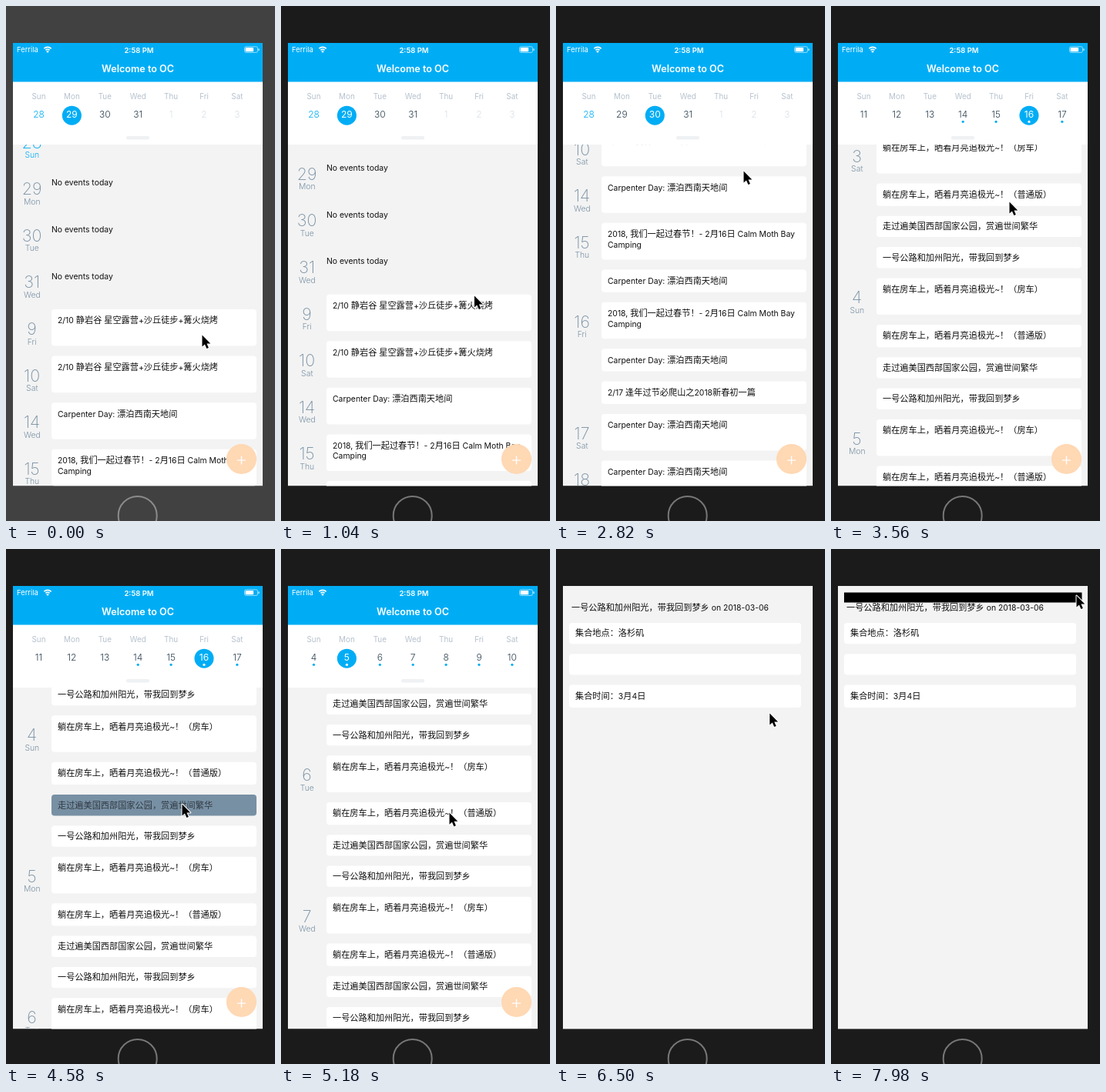
These frames come from a looping animation (349 by 669 pixels, 8 s). An HTML page with a canvas:

```html
<!DOCTYPE html>
<html lang="zh">
<head>
<meta charset="utf-8">
<title>Agenda</title>
<style>
html, body { margin: 0; width: 349px; height: 669px; overflow: hidden; background: #1b1b1b; }
canvas { display: block; }
</style>
</head>
<body>
<canvas id="stage" width="349" height="669"></canvas>
<script>
const g = document.getElementById('stage').getContext('2d');
const LOOP = 8000, TICK = 147.7; // the picture advances once per tick
const BLUE = '#00adf5', GREY = '#f3f3f3', SLATE = '#7a92a5', INK = '#111';
const LATIN = 'Inter, "Open Sans", sans-serif';
const CJK = '"Noto Sans CJK SC", "Noto Sans CJK", sans-serif';
const SCREEN = [9, 48, 324, 575.6], HEADER_BOTTOM = 98.4;

// A value moves by `delta` between two ticks; power 1 is a steady drag, higher ones coast to rest.
const clamp = p => Math.max(0, Math.min(1, p));
const easeOut = (p, power) => 1 - (1 - clamp(p)) ** power;
const leg = (n, from, to, delta, power = 1) => delta * easeOut((n - from) / (to - from), power);

const scrollAt = n => leg(n, 6, 9, 58) + leg(n, 15, 19, 236)
  + leg(n, 19, 31.1, 679, 3) + leg(n, 31, 36, 328, 2);

// From tick, to tick, dx, dy.
const STROKES = [[4, 9, -6, -85], [10, 13, 3, 111], [15, 19, -8, -239], [19, 24, -12, 40],
  [24, 31, -3, 77], [31, 33, -6, -126], [33, 36, -6, 206], [41, 45, 81, -264], [46, 51, 21, -87]];
const pointerAt = n => STROKES.reduce(([x, y], [from, to, dx, dy]) =>
  [x + leg(n, from, to, dx), y + leg(n, from, to, dy)], [254.5, 427.5]);

const NONE = 'No events today';
const NIGHT = '2/10 静岩谷 星空露营+沙丘徒步+篝火烧烤';
const ROAM = 'Carpenter Day: 漂泊西南天地间';
const CAMP = '2018, 我们一起过春节！- 2月16日 Calm Moth Bay\nCamping';
const TOUR = ['躺在房车上，晒着月亮追极光~！（房车）', '躺在房车上，晒着月亮追极光~！（普通版）',
  '走过遍美国西部国家公园，赏遍世间繁华', '一号公路和加州阳光，带我回到梦乡'];
const WEEK = ['Sun', 'Mon', 'Tue', 'Wed', 'Thu', 'Fri', 'Sat'];

const rowHeight = s => /[!-~]/.test(s) ? 29.3 : 27.3;
const rows = [];
let nextTop = 151.6;
function section(day, weekday, ...items) {
  items.forEach((text, i) => {
    const h = i ? rowHeight(text) : 47.6;
    rows.push({ text, h, top: nextTop, day: i ? 0 : day, weekday: WEEK[weekday] });
    nextTop += h + 13;
  });
}
for (let i = 0; i < 4; i++) section(28 + i, i, NONE);
section(9, 5, NIGHT);
section(10, 6, NIGHT);
section(14, 3, ROAM);
section(15, 4, CAMP, ROAM);
section(16, 5, CAMP, ROAM, '2/17 逢年过节必爬山之2018新春初一篇');
section(17, 6, ROAM);
section(18, 0, ROAM);
section(19, 1, ROAM);
for (let d = 3; d < 11; d++) section(d, (d + 3) % 7, ...TOUR);

function rect(x, y, w, h, color, r = 0) {
  g.fillStyle = color;
  g.beginPath();
  g.roundRect(x, y, w, h, r);
  g.fill();
}

function disc(x, y, r, color) {
  g.fillStyle = color;
  g.beginPath();
  g.arc(x, y, r, 0, 7);
  g.fill();
}

function arc(x, y, r, from, to, color, width) {
  g.strokeStyle = color;
  g.lineWidth = width;
  g.beginPath();
  g.arc(x, y, r, from, to);
  g.stroke();
}

// y is the middle of the capitals; Chinese runs are set a little larger.
function label(s, x, y, size = 10.4, color = INK, weight = 400, centered = false) {
  const runs = s.match(/[\x00-\xff]+|[^\x00-\xff]+/g).map(text => {
    const cjk = text.charCodeAt(0) > 255;
    const font = `${weight} ${cjk ? size * 1.075 : size}px ${cjk ? CJK : LATIN}`;
    g.font = font;
    return { text, font, width: g.measureText(text).width };
  });
  if (centered) x -= runs.reduce((sum, r) => sum + r.width, 0) / 2;
  g.fillStyle = color;
  for (const r of runs) {
    g.font = r.font;
    g.fillText(r.text, x, y + size * 0.37);
    x += r.width;
  }
}

function drawList(scroll, pressY) {
  for (const row of rows) {
    const y = row.top - scroll;
    if (y > 626 || y < 90) continue;
    if (row.day) {
      const color = row.day === 28 ? BLUE : SLATE;
      label(String(row.day), 33.6, y + 25, 21.5, color, 200, true);
      label(row.weekday, 33.8, y + 41.7, 10.4, color, 300, true);
    }
    if (row.text === NONE) {
      label(NONE, 59, y + 17.3);
      continue;
    }
    const pressed = pressY > y && pressY < y + row.h;
    rect(59, y, 266, row.h, pressed ? '#7890a4' : '#fff', 4);
    const mid = y + Math.min(row.h, 29.3) / 2;
    row.text.split('\n').forEach((line, i) =>
      label(line, 67, mid + i * 13.5, 10.4, pressed ? '#303a43' : INK));
  }
}

// First day of the shown week, and the selected column.
function calendarState(n) {
  if (n < 20) return [28, n < 17 ? 1 : 2];
  if (n < 33) return [11, n < 22 ? 3 : 5];
  return [4, n < 35 ? 0 : 1];
}

function drawCalendar(n) {
  const [first, selected] = calendarState(n);
  rect(SCREEN[0], 97, SCREEN[2], 83, '#fff');
  rect(156, 169, 30, 4.5, '#eff1f3', 2);
  WEEK.forEach((name, i) => {
    const x = 42.5 + i * 42.9, day = (first + i - 1) % 31 + 1;
    const on = i === selected, nextMonth = first === 28 && day < 28;
    const color = on ? '#fff' : nextMonth ? '#d9e1e8' : day === 28 ? BLUE : '#2d4150';
    label(name, x, 117, 9.9, '#b6c1cd', 400, true);
    if (on) disc(x, 142.2, 12.5, BLUE);
    label(String(day), x, 141, 12, color, on ? 400 : 300, true);
    if (first === 4 || first === 11 && day > 13) disc(x, 150.3, 1.6, on ? '#fff' : BLUE);
  });
}

function drawStatus() {
  label('Ferrila', 14, 57, 9.4, '#fff');
  label('2:58 PM', 172.5, 57, 9.5, '#fff', 600, true);
  for (const r of [3.6, 6.6]) arc(54, 60, r, -2.35, -0.79, '#fff', 1.6);
  disc(54, 59.3, 1.3, '#fff');
  g.lineWidth = 0.7;
  g.strokeStyle = '#d5f2ff';
  g.beginPath();
  g.roundRect(309.5, 52.8, 17, 7.6, 2);
  g.stroke();
  rect(310.6, 53.9, 10.5, 5.4, '#fff', 1);
  rect(327.4, 55.2, 1.2, 2.8, '#d5f2ff', 0.6);
}

function drawAgenda(n, pointerY) {
  const collapsed = n >= 39, pressing = n === 31 || n >= 38;
  const shift = collapsed ? -2 : 0;
  const [left, top, width] = SCREEN;
  g.save();
  g.translate(0, shift);
  drawList(scrollAt(n), pressing ? pointerY - shift : -1);
  drawCalendar(n);
  rect(left, top, width, HEADER_BOTTOM - top, BLUE);
  label('Welcome to OC', 171, 81, 12.6, '#fff', 600, true);
  disc(305.5, 588.5, 19.6, '#ffd8b4');
  rect(300, 589.4, 11, 1.4, '#fff');
  rect(304.8, 584.6, 1.4, 11, '#fff');
  g.restore();
  if (collapsed) rect(left, top, width, 14, '#fff');
  else drawStatus();
}

function drawDetail(n, dx) {
  g.save();
  g.translate(dx, 0);
  rect(...SCREEN, GREY);
  if (n >= 54) rect(17, 56.5, 308.5, 13, '#000');
  label(TOUR[3] + ' on 2018-03-06', 20, 76.3);
  let y = 96;
  for (const s of ['集合地点：洛杉矶', '', '集合时间：3月4日']) {
    const h = rowHeight(s);
    rect(17, y, 301, h, '#fff', 4);
    if (s) label(s, 25, y + h / 2);
    y += h + 13;
  }
  g.restore();
}

function drawPointer(x, y) {
  g.beginPath();
  [[0, 0], [0, 15], [3.4, 12], [5.9, 17.6], [8.4, 16.5], [6, 11], [10.8, 11]]
    .forEach(([px, py]) => g.lineTo(x + px, y + py));
  g.closePath();
  g.lineWidth = 2;
  g.lineJoin = 'round';
  g.strokeStyle = '#fff';
  g.stroke();
  g.fillStyle = '#000';
  g.fill();
}

function draw(time) {
  const n = Math.floor(time % LOOP / TICK);
  const [px, py] = pointerAt(n), dark = n >= 4;
  rect(0, 0, 349, 669, dark ? '#1b1b1b' : '#414141');
  arc(170.7, 662, 25, 0, 7, dark ? '#777' : '#8b8b8b', 2);

  g.save();
  g.beginPath();
  g.rect(...SCREEN);
  g.clip();
  rect(...SCREEN, GREY);
  const slide = easeOut((n - 39) / 5, 3);
  if (slide < 1) drawAgenda(n, py);
  if (slide > 0) drawDetail(n, SCREEN[2] * (1 - slide));
  g.restore();
  drawPointer(px, py);
}

const start = performance.now();
(function frame() {
  draw(performance.now() - start);
  requestAnimationFrame(frame);
})();
</script>
</body>
</html>
```
